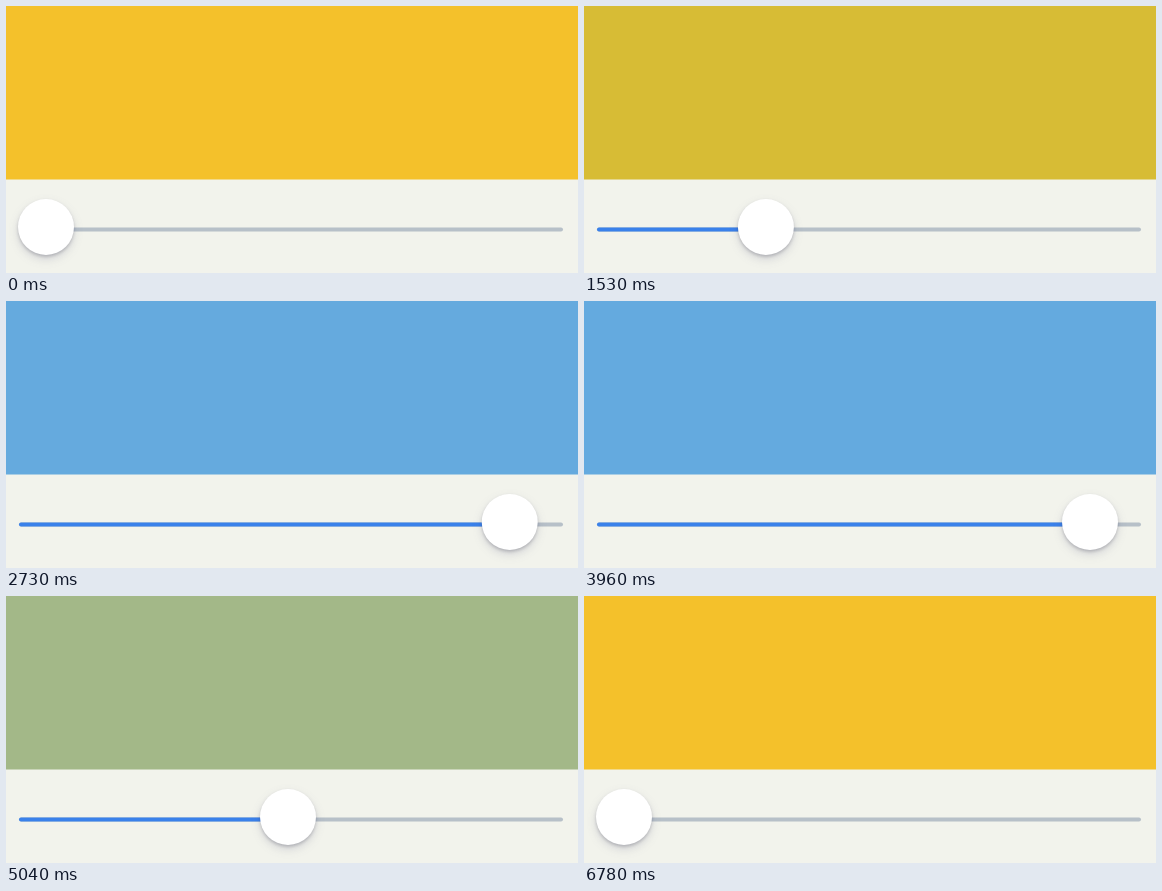
Recreate the animation shown at these times as an HTML page. Size 572 by 267 pixels, loop 9280 ms.

```html
<!DOCTYPE html>
<html lang="en">
<head>
<meta charset="utf-8">
<title>Colour slider</title>
<style>
  html, body { margin: 0; width: 100%; height: 100%; overflow: hidden; background: #f2f3ec; }
  svg { display: block; }
  #thumb {
    fill: #fff;
    filter: drop-shadow(0 2px 1.5px rgba(40, 40, 60, .22)) drop-shadow(0 4px 5px rgba(60, 60, 110, .16));
  }
</style>
</head>
<body>
<svg width="572" height="267">
  <rect id="swatch" width="572" height="173.5"/>
  <rect x="13" y="221.4" width="544" height="4" rx="2" fill="#b7c0c8"/>
  <rect id="fill" x="13" y="221.4" height="4" rx="2" fill="#3a81ea"/>
  <circle id="thumb" cy="221" r="28"/>
</svg>
<script>
const LOOP = 9280, STROKE = 884;
const LEFT = 40, RIGHT = 506;

// Three strokes back to back, then two after a rest; all last equally long.
const strokes = [
  { at: 120, to: 372 },
  { at: 120 + STROKE, to: 79 },
  { at: 120 + 2 * STROKE, to: RIGHT },
  { at: 3990, to: 282 },
  { at: 5880, to: LEFT }
];

const ease = p => (1 - Math.cos(Math.PI * Math.min(1, Math.max(0, p)))) / 2;
const thumbX = t => strokes.reduce((x, s) => x + (s.to - x) * ease((t - s.at) / STROKE), LEFT);

const [swatch, fill, thumb] = ["swatch", "fill", "thumb"].map(id => document.getElementById(id));

// The swatch colour follows the thumb's place, used as the animation's time.
const stops = { [LEFT]: "#f4c12b", 182: "#d7bc35", 246: "#c7b85f", 278: "#a4b886", [RIGHT]: "#64aadf" };
const tint = swatch.animate(
  Object.entries(stops).map(([x, color]) => ({ fill: color, offset: (x - LEFT) / (RIGHT - LEFT) })),
  { duration: RIGHT - LEFT, fill: "both" }
);
tint.pause();

const start = performance.now();

function draw() {
  const x = thumbX((performance.now() - start) % LOOP);
  tint.currentTime = x - LEFT;
  fill.setAttribute("width", x - 13);
  thumb.setAttribute("cx", x);
  requestAnimationFrame(draw);
}
draw();
</script>
</body>
</html>
```
